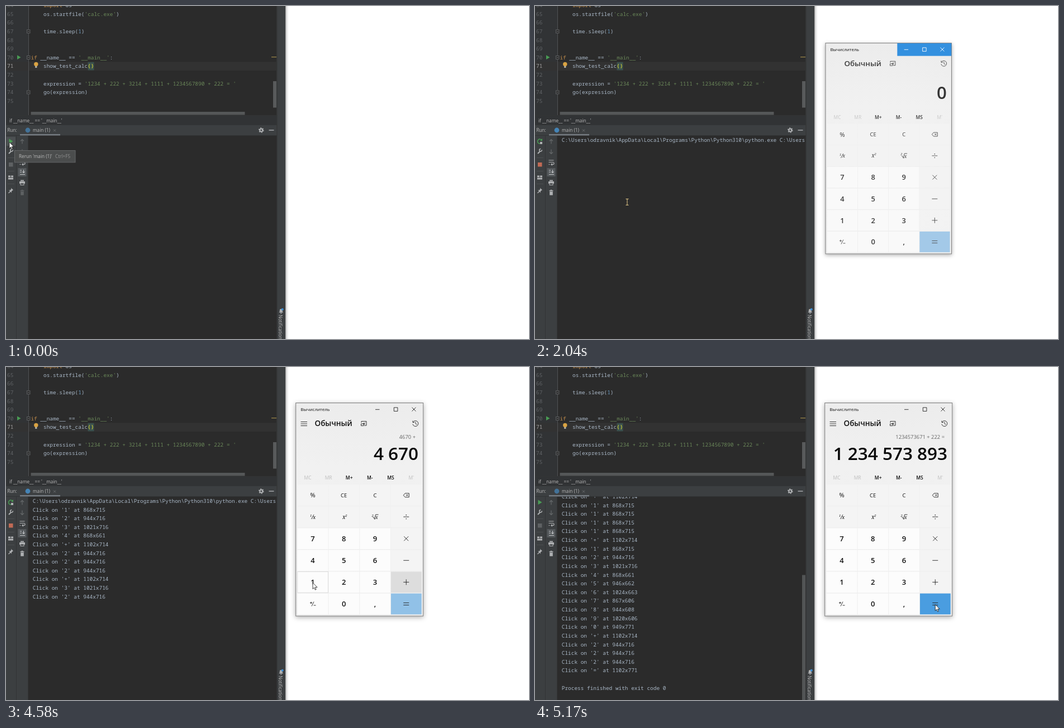
These frames come from a looping animation (936x598 px, 5.44 s). An HTML page:

```html
<!DOCTYPE html>
<html lang="ru">
<head>
<meta charset="utf-8">
<title>Calculator clicks</title>
<style>
html, body { margin: 0; width: 100%; height: 100%; overflow: hidden; background: #fff; }
svg { display: block; width: 100vw; height: 100vh; }
text { font-family: "Open Sans", "Noto Sans", sans-serif; font-size: 8.2px; fill: #bbb; }
.code { font-family: "Noto Sans Mono", "DejaVu Sans Mono", monospace; font-size: 9.43px; fill: #a9b7c6; }
.num { fill: #606366; }
.str { fill: #6a8759; }
.key { fill: #bd8a4a; }
.math { font-family: "Noto Serif", serif; font-style: italic; }
</style>
</head>
<body>
<svg id="stage" viewBox="0 0 936 598">
  <defs>
    <linearGradient id="edge"><stop stop-color="#a0a0a0"/><stop offset=".4" stop-color="#e4e4e4"/><stop offset="1" stop-color="#fff"/></linearGradient>
    <linearGradient id="face" x2="0" y2="1"><stop stop-color="#ececec"/><stop offset=".3" stop-color="#f1f1f1"/><stop offset="1" stop-color="#eee"/></linearGradient>
    <filter id="shadow" x="-10%" y="-10%" width="120%" height="120%"><feDropShadow dx="0" dy="2" stdDeviation="4" flood-opacity=".33"/></filter>
    <clipPath id="editor"><path d="M0 0H484.5V196H0z"/></clipPath>
    <clipPath id="console"><path d="M40 233H484.5V598H40z"/></clipPath>
  </defs>
  <g id="ide"></g>
  <g id="live"></g>
</svg>
<script>
const LOOP = 5440, PITCH = 15.62;
const KEYS = '1234+222+3214+1111+1234567890+222=';
const SPOTS = {
  1: '868x715', 2: '944x716', 3: '1021x716', 4: '868x661', 5: '946x662', 6: '1024x663',
  7: '867x606', 8: '944x608', 9: '1020x606', 0: '949x771', '+': '1102x714', '=': '1102x771'
};
const PAD = ['%', 'CE', 'C', 'del', 'inv', 'sqr', 'root', '÷', '7', '8', '9', '×',
  '4', '5', '6', '−', '1', '2', '3', '+', 'neg', '0', ',', '='];
const COMMAND = String.raw`C:\Users\odravnik\AppData\Local\Programs\Python\Python310\python.exe C:\Users`;

const $ = id => document.getElementById(id);
const text = (x, y, s, attr = '') => `<text x="${x}" y="${y}" ${attr}>${s}</text>`;
const code = (x, y, s, cls = '') => text(x, y + 3.3, s, `class="code ${cls}"`);
const rect = (x, y, w, h, fill, attr = '') =>
  `<rect x="${x}" y="${y}" width="${w}" height="${h}" fill="${fill}" ${attr}/>`;
const line = (d, color, w = 1, attr = '') =>
  `<path d="${d}" fill="none" stroke="${color}" stroke-width="${w}" ${attr}/>`;
const shape = (d, fill) => `<path d="${d}" fill="${fill}"/>`;
const span = (cls, s) => `<tspan class="${cls}">${s}</tspan>`;
const clamp = v => Math.max(0, Math.min(1, v));

function ide() {
  const rowY = n => 14.5 + 15.6 * (n - 65);
  let s = rect(500, 0, 6, 598, 'url(#edge)') + rect(0, 0, 500, 598, '#3c3f41');

  // editor
  s += '<g clip-path="url(#editor)">' + rect(0, 0, 484.5, 196, '#2b2b2b') + rect(0, 0, 40, 196, '#313335');
  s += rect(0, 100.3, 484.5, 15.6, '#323232') + line('M40.5 0V196', '#505254');
  for (let n = 64; n < 76; n++)
    s += text(2, rowY(n) + 3.3, n, `class="code num" ${n == 71 ? 'style="fill:#a4a3a3"' : ''}`);
  s += rect(146.5, 100.8, 11, 14.6, '#3b514d');
  const rows = {
    64: span('key', 'import') + ' os',
    65: 'os.startfile(' + span('str', "'calc.exe'") + ')',
    67: 'time.sleep(<tspan style="fill:#6897bb">1</tspan>)',
    71: 'show_test_calc<tspan style="fill:#ffef28">()</tspan>',
    73: 'expression = ' + span('str', "'1234 + 222 + 3214 + 1111 + 1234567890 + 222 = '"),
    74: 'go(expression)'
  };
  for (const n in rows) s += code(67, rowY(n), rows[n]);
  s += code(44.4, rowY(70), span('key', 'if') + ' __name__ == ' + span('str', "'__main__'") + ':');
  for (const n of [67, 70, 74])
    s += rect(37.5, rowY(n) - 3, 5.5, 6, '#2b2b2b', 'stroke="#66696b" stroke-width=".8"') +
      line(`M38.8 ${rowY(n)}h3`, '#7a7d7f', .8);
  s += shape('M20 88.3l6.5 3.9-6.5 3.9z', '#499c54') + rect(475, 91, 9.5, 1.2, '#a08a4a');
  s += rect(478, 135, 6, 47.5, '#585a5b') + rect(44.5, 190, 383, 5.5, '#555758') + '</g>';

  // breadcrumb and panel header
  s += rect(0, 197, 484.5, 16, '#313335');
  s += line('M0 196.5H485M0 213.5H485M0 232.5H485M18.5 233V598M485 0V598', '#323435');
  s += text(6, 208.6, "if __name__ == '__main__'") + text(2.5, 226.4, 'Run:') + text(48, 226.4, 'main (1)');
  s += rect(25, 230, 72, 2.5, '#747a80') + line('M85 221.5l4 4m0-4l-4 4', '#747779', .8);
  s += line('M470.5 223H479.5', '#afb1b3', 1.4);
  s += '<circle cx="456.8" cy="223" r="2.5" fill="none" stroke="#afb1b3" stroke-width="2"/>' +
    '<circle cx="456.8" cy="223" r="4" fill="none" stroke="#afb1b3" stroke-width="1.5" stroke-dasharray="2 2.19"/>';
  s += rect(39.5, 233, 445, 365, '#2b2b2b');

  // tool columns
  s += line('M3 272.5H15M3 296.5H15M3 319.5H15', '#4c4f51');
  s += line('M5 265l4-4', '#afb1b3', 2) + line('M12.3 258.3a2.3 2.3 0 1 1-2-1.8', '#afb1b3', 1.6);
  s += rect(4, 304.5, 4, 3, '#afb1b3') + rect(9, 304.5, 4, 3, '#afb1b3') + rect(4, 308.5, 9, 3, '#afb1b3');
  s += shape('M9 326.5l4 4-1.2.6-2 2 .2 2.4-2-2-3 3-.9-.9 3-3-2-2 2.4.2 2-2z', '#afb1b3');
  s += line('M29 247.5v-8m-3 3l3-3 3 3M29 257.5v8m-3-3l3 3 3-3', '#66696b', 1.2);
  s += line('M24.5 277h9M24.5 280.5h7.5a2 2 0 0 1 0 4h-2.5M24.5 284.5h2', '#afb1b3', 1.2) +
    shape('M31 282v5l-3-2.5z', '#afb1b3');
  s += rect(21.5, 291, 15, 15, '#55595c') +
    line('M25 295h3M25 298.3h3M25 302.5h9M31.5 294v5.5m-2-2l2 2 2-2', '#c3c5c7', 1.1);
  s += rect(26, 312.5, 6, 2, '#afb1b3') + rect(24, 315, 10, 4, '#afb1b3') + rect(26, 318, 6, 3.5, '#3c3f41', 'stroke="#afb1b3"');

  // right strip
  s += shape('M488.5 550.5h7.5l-1.2-2v-2a2.5 2.5 0 0 0-5 0v2zM491 551h2.5v1.3h-2.5z', '#afb1b3');
  s += '<circle cx="494.7" cy="544.8" r="2" fill="#3d8fd6"/>';
  return s + text(0, 0, 'Notifications', 'transform="translate(488.4 554.5) rotate(90)"');
}

// State of the run panel: icons, tooltip, bulb
function panel(t, running, started) {
  let s = '';
  if (t < 730 || t >= 1830) s += '<circle cx="53.8" cy="104.5" r="3.7" fill="#d9a343"/>' + rect(52.2, 108, 3.2, 3, '#b0b0a8');
  s += `<circle cx="39" cy="223" r="4.4" fill="#4584b6" opacity="${running ? 1 : .75}"/>`;
  if (t < 1490) s += rect(1, 235, 16, 16, '#4c5052');
  s += running
    ? line('M12 241a4 4 0 1 0 .3 3.6', '#499c54', 1.5) + shape('M13 238v4h-4z', '#499c54') + rect(9, 244, 4, 4, '#afb1b3')
    : shape('M5.5 238.5l7 4.4-7 4.4z', '#499c54');
  s += rect(5, 281, 7.5, 7.5, running ? '#c06a55' : '#5e6163');
  const bin = started ? '#afb1b3' : '#5e6163';
  s += rect(25.5, 331, 7, 1.4, bin) + rect(27.5, 330, 3, 1, bin) + rect(26.2, 333.2, 5.6, 6.5, bin);
  if (t < 730)
    s += rect(15.5, 259.5, 108.5, 21.3, '#4b4d4d', 'stroke="#656768"') +
      text(23, 273.2, "Rerun 'main (1)'") + text(88, 273.2, 'Ctrl+F5', 'style="fill:#919191"');
  return s;
}

function output(clicks, done) {
  const lines = [COMMAND];
  for (const k of KEYS.slice(0, clicks)) lines.push(`Click on '${k}' at ${SPOTS[k]}`);
  if (done) lines.push('', 'Process finished with exit code 0');
  const last = lines.length - 1, top = 240.6 - Math.max(0, last * PITCH - 335.7);
  let s = '<g clip-path="url(#console)">';
  lines.forEach((l, i) => {
    const y = top + i * PITCH;
    if (l && y > 220) s += code(47.8, y, l);
  });
  const thumb = 365 * 365 / ((last + 2) * PITCH);
  if (thumb < 365) s += rect(478, 598 - thumb, 6, thumb, '#525455');
  return s + '</g>';
}

// What the display shows after a number of key presses
function display(count) {
  let sum = 0, entry = '', note = '', shown = 0;
  for (const k of KEYS.slice(0, count)) {
    if (k == '+') { shown = sum += +entry; entry = ''; note = sum + ' +'; }
    else if (k == '=') { note = `${sum} + ${entry} =`; shown = sum + +entry; }
    else shown = +(entry += k);
  }
  return [note, String(shown).replace(/\B(?=(\d{3})+$)/g, ' ')];
}

const cell = k => {
  const i = PAD.indexOf(k);
  return [549 + i % 4 * 55.75, 230 + (i >> 2) * 39.1];
};

function label(k, x, y) {
  const mid = (s, size, dy, attr = '') =>
    text(x, y + dy, s, `text-anchor="middle" style="font-size:${size}px;fill:#111" ${attr}`);
  const sup = (n, dx, dy) => text(x + dx, y + dy, n, 'class="math" style="font-size:6px;fill:#111"');
  const ink = d => line(d, '#222', .9, `transform="translate(${x} ${y})"`);
  if (/[0-9,]/.test(k)) return mid(k, 13, 4.8, 'font-weight="600"');
  switch (k) {
    case '%': return mid('%', 11.5, 4.3);
    case 'CE': case 'C': return mid(k, 9.5, 3.6);
    case 'del': return ink('M-5 .3l3-3.5h7v7h-7zM0-1.2l3 3m0-3l-3 3');
    case 'inv': return sup('1', -5, 0) + ink('M-2.5 4L2-4') + text(x, y + 3.5, 'x', 'class="math" style="font-size:9.5px;fill:#111"');
    case 'sqr': return mid('x', 10, 3.5, 'class="math"') + sup('2', 2.6, -.5);
    case 'root': return sup('2', -6, -.5) + ink('M-4 1l1.2-.6 2 4L1-4h5') + text(x + .5, y + 4, 'x', 'class="math" style="font-size:8.5px;fill:#111"');
    case 'neg': return ink('M-5-2h4M-3-4v4M-2 4L2-4M1.5 2.5h4');
    case '÷': return ink('M-5 0h10') + shape(`M${x - .7} ${y - 4}h1.4v1.4h-1.4zM${x - .7} ${y + 2.8}h1.4v1.4h-1.4z`, '#222');
    case '×': return ink('M-4-4l8 8m0-8l-8 8');
    case '−': return ink('M-5 0h10');
    case '+': return ink('M-5 0h10M0-5v10');
    case '=': return ink('M-5-2h10M-5 2h10');
  }
}

function keypad(at, finished) {
  let s = '';
  PAD.forEach((k, i) => {
    const [x, y] = cell(k), digit = i > 7 && i % 4 < 3;
    let fill = digit ? '#fcfcfc' : '#f4f4f4', attr = '';
    if (k == '=') fill = finished ? '#4a9de0' : '#91c1e7';
    else if (!finished && k == KEYS[at - 2]) fill = '#dddddd';
    else if (!finished && k == KEYS[at - 1]) attr = 'stroke="#dcdcdc"';
    s += rect(x - 27.3, y - 18.8, 54.8, 37.6, fill, attr) + label(k, x, y);
  });
  return s;
}

function calculator(t, pressed, at, finished) {
  const scale = 1 - .011 * Math.max(0, (2370 - t) / 330) ** 2;
  const blue = t < 2240, ink = blue ? '#fff' : '#222';
  let s = `<g transform="translate(632.6 255.7) scale(${scale}) translate(-632.6 -255.7)" opacity="${clamp((t - 1830) / 170)}">`;
  s += rect(518.7, 64.5, 228, 382.7, 'url(#face)', 'stroke="#7c7c7c" filter="url(#shadow)"');
  s += text(527.3, 79.3, 'Вычислитель', 'style="font-size:8px;fill:#111"');
  if (blue) s += rect(648.5, 64.8, 98, 23, '#3390df');
  s += line('M661 76.3h7.5M694.3 72.8h6.6v6.6h-6.6zM726.5 72.5l7 7m0-7l-7 7', ink, .9);
  if (t < 2035) return s + '</g>';

  s += `<g opacity="${clamp(.8 + (t - 2035) / 1600)}">`;
  if (!blue) s += line('M527.5 98.5h11.5M527.5 102h11.5M527.5 105.5h11.5', '#222', .9);
  s += text(552.5, 106.3, 'Обычный', 'font-weight="600" style="font-size:13.5px;fill:#111"');
  s += line('M636 100v-2.5h9v7.5h-4M635.5 102h4.5v3.5h-4.5zM643 99.5l-3 3m0-2.5v2.5h2.5', '#222', .9);
  s += line('M728.5 99a5 5 0 1 1-.6 3.5M728 96.5v3h3M733 98.5v3.3l2.6 1.5', '#222', .9);
  const [note, shown] = display(pressed);
  s += text(733, 128.5, note, 'text-anchor="end" style="font-size:9.4px;fill:#666"');
  s += text(738, 166.5, shown, 'text-anchor="end" font-weight="600" style="font-size:31.5px;fill:#080808"');
  ['MC', 'MR', 'M+', 'M-', 'MS', 'M˅'].forEach((m, i) => {
    const on = i > 1 && i < 5;
    s += text(540 + i * 37.1, 202, m, `text-anchor="middle" font-weight="${on ? 600 : 400}" style="font-size:8.5px;fill:${on ? '#111' : '#bdbdbd'}"`);
  });
  return s + keypad(at, finished) + '</g></g>';
}

const arrow = (x, y) =>
  `<path transform="translate(${x} ${y})" d="M0 0v11.2l2.6-2.4 1.7 4 1.8-.8-1.7-3.8h3.6z" fill="#fff" stroke="#111" stroke-width=".8"/>`;
const beam = (x, y, color, w = 1) =>
  line('M-2.5-5.5h5M0-5.5v11M-2.5 5.5h5', color, w, `transform="translate(${x} ${y})"`);

function pointer(t, at) {
  if (t >= 4300) {
    const [x, y] = cell(KEYS[at]);
    return at ? arrow(x, y + 1) : beam(x + 2, y - .5, '#333') + beam(164.7, 351.5, '#b58f45', .7);
  }
  const p = clamp((t - 1490) / 350), e = p * p * (3 - 2 * p);
  const x = 6 + 159 * e, y = 244.5 + 107.5 * e;
  return x < 40 ? arrow(x, y) : beam(x, y, '#e3c98a');
}

function scene(t) {
  if (t >= 1490 && t < 2370) t = 1490 + Math.floor((t - 1490) / 68.6) * 68.6;
  const step = t < 4300 ? 0 : Math.floor((t - 4300) / 67);
  const at = Math.min(33, Math.round(step * 3.71));
  const finished = step > 9, done = t >= 5170, started = t >= 1010;
  const pressed = finished ? 34 : Math.max(0, at - 1);
  const logged = finished ? 34 : Math.max(0, at - 4);
  return panel(t, started && !done, started) + (started ? output(logged, done) : '') +
    (t > 1880 ? calculator(t, pressed, at, finished) : '') + pointer(t, at);
}

$('ide').innerHTML = ide();
let drawn = '';
const start = performance.now();
function frame() {
  const next = scene((performance.now() - start) % LOOP);
  if (next != drawn) $('live').innerHTML = drawn = next;
  requestAnimationFrame(frame);
}
frame();
</script>
</body>
</html>
```
